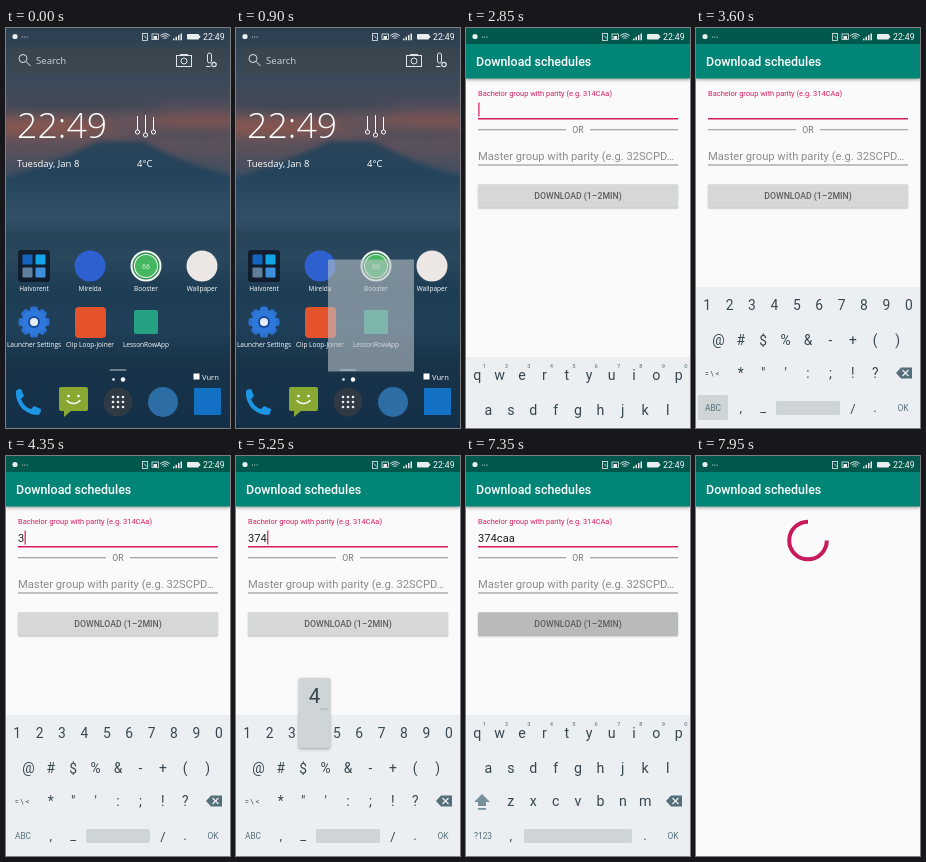
An HTML page with a canvas for the animation above (8000 ms loop, 224 px wide and 400 px high).

```html
<!DOCTYPE html>
<html lang="en">
<head>
<meta charset="utf-8">
<title>Schedule download</title>
<style>
html, body { margin: 0; width: 100%; height: 100%; overflow: hidden; background: #fafafa; }
canvas { display: block; width: 224px; height: 400px; }
</style>
</head>
<body>
<canvas id="stage"></canvas>
<script>
const W = 224, H = 400, LOOP = 8000, STEP = 150;
const canvas = document.getElementById('stage');
const ctx = canvas.getContext('2d');
const ratio = window.devicePixelRatio || 1;
canvas.width = W * ratio;
canvas.height = H * ratio;

const ROBOTO = 'Roboto, sans-serif';
const OPEN = '"Open Sans", sans-serif';
const PINK = '#d81b60', INK = '#37474f', TEAL = '#008577';

function text(s, x, y, size, color, align = 'left', weight = 400, family = ROBOTO) {
  ctx.font = `${weight} ${size}px ${family}`;
  ctx.textAlign = align;
  ctx.fillStyle = color;
  ctx.fillText(s, x, y);
}

function box(x, y, w, h, color, r = 0) {
  ctx.fillStyle = color;
  ctx.beginPath();
  ctx.roundRect(x, y, w, h, r);
  ctx.fill();
}

function disc(x, y, r, color) {
  ctx.fillStyle = color;
  ctx.beginPath();
  ctx.arc(x, y, r, 0, Math.PI * 2);
  ctx.fill();
}

function ring(x, y, r, color, width = 1, from = 0, to = Math.PI * 2) {
  ctx.strokeStyle = color;
  ctx.lineWidth = width;
  ctx.beginPath();
  ctx.arc(x, y, r, from, to);
  ctx.stroke();
}

function poly(points, color) {
  ctx.fillStyle = color;
  ctx.beginPath();
  points.forEach(([x, y]) => ctx.lineTo(x, y));
  ctx.fill();
}

function line(x1, y1, x2, y2, color, width = 1) {
  ctx.strokeStyle = color;
  ctx.lineWidth = width;
  ctx.beginPath();
  ctx.moveTo(x1, y1);
  ctx.lineTo(x2, y2);
  ctx.stroke();
}

function shade(y1, y2, colors) {
  const g = ctx.createLinearGradient(0, y1, 0, y2);
  colors.forEach(([at, c]) => g.addColorStop(at, c));
  return g;
}

function withShadow(draw, blur = 3, dy = 1, color = 'rgba(0,0,0,.35)') {
  ctx.save();
  ctx.shadowColor = color;
  ctx.shadowBlur = blur * ratio;
  ctx.shadowOffsetY = dy * ratio;
  draw();
  ctx.restore();
}

// ---- status bar ----
function statusBar() {
  const c = '#e8eeee';
  disc(9, 8.5, 2.6, c);
  for (let i = 0; i < 3; i++) disc(16.5 + i * 2.3, 9, 0.6, c);
  ctx.strokeStyle = c;
  ctx.lineWidth = 0.8;
  ctx.strokeRect(136.5, 5.5, 5, 7);
  line(138, 7.5, 140.5, 10.5, c, 0.8);
  ctx.strokeRect(146, 6, 6.5, 5.5);
  box(147.5, 8, 3.5, 3, c);
  for (let i = 1; i < 4; i++) ring(159, 12, i * 2.1, c, 1, -Math.PI * 0.78, -Math.PI * 0.22);
  for (let i = 0; i < 4; i++) box(167 + i * 2.5, 10.5 - i * 1.7, 1.5, 1.7 + i * 1.7, c);
  box(181, 6, 12, 5.5, c, 1);
  box(193, 7.5, 1.2, 2.5, c);
  text('22:49', 197, 12.2, 8.7, '#f4f7f7');
}

// ---- home screen ----
function cloud(x, y, rx, ry, color) {
  ctx.fillStyle = color;
  ctx.beginPath();
  ctx.ellipse(x, y, rx, ry, 0, 0, Math.PI * 2);
  ctx.fill();
}

function wallpaper() {
  box(0, 0, W, H, shade(0, H, [
    [0, '#2b3f50'], [0.1, '#35495a'], [0.17, '#434a59'], [0.23, '#64535b'],
    [0.28, '#62525a'], [0.34, '#4a4f5e'], [0.4, '#344e64'], [0.47, '#35526a'],
    [0.52, '#284459'], [0.57, '#29475d'], [0.66, '#1d3d54'], [0.75, '#20405a'],
    [0.84, '#183348'], [1, '#143049']]));
  ctx.save();
  ctx.filter = 'blur(4px)';
  cloud(30, 99, 75, 9, 'rgba(150,88,74,.65)');
  cloud(200, 92, 55, 7, 'rgba(140,84,76,.5)');
  cloud(70, 77, 90, 4, 'rgba(48,64,82,.6)');
  cloud(180, 108, 60, 4, 'rgba(66,76,94,.6)');
  ctx.filter = 'blur(2.5px)';
  ctx.fillStyle = shade(112, 200, [[0, '#2b4459'], [0.4, '#23445c'], [0.7, '#2d4c64'], [1, 'rgba(45,76,100,0)']]);
  ctx.beginPath();
  ctx.moveTo(-10, 152);
  ctx.bezierCurveTo(30, 142, 66, 126, 92, 113);
  ctx.lineTo(138, 113);
  ctx.bezierCurveTo(160, 126, 190, 140, 236, 150);
  ctx.lineTo(236, 205);
  ctx.lineTo(-10, 205);
  ctx.fill();
  ctx.restore();
}

function searchBar() {
  const c = '#dfe3e8';
  box(5, 19, 214, 27, 'rgba(62,70,76,.6)', 1);
  ring(17, 30.5, 4, c, 1);
  line(20, 33.5, 24.5, 38, c, 1);
  text('Search', 30, 36, 9.6, '#cfd4da', 'left', 400, OPEN);
  ctx.strokeStyle = c;
  ctx.lineWidth = 1;
  ctx.strokeRect(170.5, 27.5, 15, 11);
  box(174, 26, 8, 1.5, c);
  ring(178, 33, 3, c, 1);
  mic(203.5, 31, c);
}

function mic(x, y, c) {
  ctx.strokeStyle = c;
  ctx.lineWidth = 1;
  ctx.beginPath();
  ctx.roundRect(x - 2, y - 6, 4, 10, 2);
  ctx.stroke();
  line(x - 3.5, y + 7.5, x + 1, y + 7.5, c);
  ring(x + 4.5, y + 5.5, 2.2, c, 1.2);
}

function gear(x, y) {
  ctx.save();
  ctx.translate(x, y);
  for (let i = 0; i < 8; i++) {
    box(-4, -15.5, 8, 8, '#2b6fd0', 2);
    ctx.rotate(Math.PI / 4);
  }
  ctx.restore();
  disc(x, y, 12.5, '#2f78db');
  disc(x, y, 6, '#184a9c');
  disc(x, y, 4, '#e9eef5');
}

function label(s, x, y) {
  text(s, x, y, 6.5, '#fff', 'center', 500, OPEN);
}

function apps() {
  box(12, 222, 32, 32, 'rgba(14,24,36,.85)', 3);
  ['#1565c0', '#12a5e8', '#5f7f9c', '#3f8fdc'].forEach((c, i) =>
    box(16.5 + i % 2 * 13, 226.5 + (i >> 1) * 13, 10, 10, c, 1));
  disc(84, 238, 15.5, '#2f60cf');
  disc(140, 238, 15.5, '#f1f5f1');
  ring(140, 238, 12.8, '#2f8f4c', 1.4);
  disc(140, 238, 11, '#45b85f');
  text('66', 140, 240.5, 7, '#d9f5df', 'center');
  disc(196, 238, 15.5, '#ece6e4');
  ['Halvorent', 'Mirelda', 'Booster', 'Wallpaper'].forEach((s, i) => label(s, 28 + i * 56, 263));
  gear(28, 294);
  box(69, 279, 31, 31, '#e5532d', 4);
  box(128, 282, 24, 24, '#27a184', 2);
  ['Launcher Settings', 'Clip Loop-Joiner', 'LessonRowApp'].forEach((s, i) => label(s, 28 + i * 56, 319));
}

function dock() {
  box(103.5, 341, 17, 2, 'rgba(170,180,188,.6)', 1);
  disc(107.5, 351.5, 1.4, '#c8cdd4');
  disc(117, 351.5, 2.2, '#fff');
  box(187.5, 345.5, 6, 6, '#fff');
  text('Vurn', 196, 352, 7.6, '#fff', 'left', 400, OPEN);

  ctx.fillStyle = '#1e96e6';
  ctx.beginPath();
  ctx.moveTo(10, 363);
  ctx.quadraticCurveTo(11, 361, 15, 361);
  ctx.lineTo(18, 368);
  ctx.lineTo(15, 371);
  ctx.quadraticCurveTo(18, 379, 25, 381);
  ctx.lineTo(28, 378);
  ctx.lineTo(35, 381);
  ctx.quadraticCurveTo(35, 386, 32, 387);
  ctx.bezierCurveTo(19, 387, 9, 376, 10, 363);
  ctx.fill();

  box(53, 359, 29, 24, '#88a832', 2);
  poly([[58, 382], [58, 389], [66, 382]], '#88a832');
  disc(62.5, 368, 1.3, '#fff');
  disc(72.5, 368, 1.3, '#fff');
  ring(67.5, 366.5, 9, '#fff', 1.4, 0.7, Math.PI - 0.7);

  disc(112, 374, 14.5, '#303a44');
  for (let i = 0; i < 9; i++) disc(107 + i % 3 * 5, 369 + Math.floor(i / 3) * 5, 1.3, '#eceff2');
  disc(157, 374, 15, '#2c6da6');
  box(188, 360, 27, 27, '#1271c4', 1);
}

function home() {
  wallpaper();
  statusBar();
  searchBar();
  text('22:49', 11, 109.5, 35.8, '#fff', 'left', 300, OPEN);
  [[131.5, 88, 104], [139.5, 87, 107], [147.5, 89, 104]].forEach(([x, top, y]) => {
    line(x, top, x, y - 2, '#fff', 1);
    ring(x, y, 2.1, '#fff', 1);
  });
  text('Tuesday, Jan 8', 11, 139, 9.5, '#fff', 'left', 400, OPEN);
  text('4°C', 131, 139, 9.5, '#fff', 'left', 400, OPEN);
  apps();
  dock();
}

// ---- app screens ----
function appFrame(title) {
  box(0, 0, W, H, '#fafafa');
  withShadow(() => box(0, 16, W, 34.5, TEAL), 3, 1.2);
  box(0, 0, W, 16, '#00574b');
  statusBar();
  text(title, 10, 38.2, 12.44, '#fff', 'left', 500);
}

function button(s, x, y, w, h, pressed, color) {
  withShadow(() => box(x, y, w, h, pressed ? '#b9bbbb' : '#d6d7d7', 1.2), 1.5, 0.6, 'rgba(0,0,0,.28)');
  text(s, x + w / 2, y + h / 2 + 3.2, 8.71, color, 'center', 500);
}

function welcome(pressed) {
  appFrame('LessonRowApp');
  text('Welcome to a better understanding of the timetable !', 10, 69.5, 8.71, '#757575');
  button('START', 87, 213.5, 50, 23.3, pressed, '#212121');
}

function form(typed, cursor, pressed) {
  appFrame('Download schedules');
  text('Bachelor group with parity (e.g. 314CAa)', 12, 68, 7.47, PINK);
  text(typed, 12, 86, 11.2, '#212121');
  if (cursor) {
    const x = 12.3 + ctx.measureText(typed).width;
    box(x, 74.5, 1.2, 14, PINK);
  }
  box(12, 90, 200, 1.4, PINK);
  box(12, 101.2, 88, 1, '#8d8d8d');
  box(124, 101.2, 88, 1, '#8d8d8d');
  text('OR', 112, 105, 8.71, '#757575', 'center');
  text('Master group with parity (e.g. 32SCPD…', 12, 132, 11.2, '#8c8c8c');
  box(12, 136.6, 200, 0.8, '#8a8a8a');
  button('DOWNLOAD (1–2MIN)', 12, 156.3, 200, 23.5, pressed, '#5c5f5f');
}

function spinner(from, to) {
  appFrame('Download schedules');
  ring(112, 84.5, 18.8, '#c8195a', 4, from * Math.PI * 2, to * Math.PI * 2);
}

// ---- keyboard ----
const ROWS = [277, 312, 345, 380];
const PITCH = 22.4;
const LAYOUT = {
  letters: ['qwertyuiop', 'asdfghjkl', 'zxcvbnm'],
  symbols: ['1234567890', '@#$%&-+()', '*"\':;!?']
};
const ROW_START = [11.2, 22.4, 44.8];

function popup(ch, mode) {
  const row = LAYOUT[mode].findIndex(r => r.includes(ch));
  const x = ROW_START[row] + LAYOUT[mode][row].indexOf(ch) * PITCH;
  const y = ROWS[row];
  withShadow(() => box(x - 15.5, y - 55, 31, 70, '#cfd4d7', 1.5), 3, 1);
  text(ch, x, y - 30, 20.5, INK, 'center');
  for (let i = 0; i < 3; i++) disc(x + 7.5 + i * 2.5, y - 24, 0.6, '#607d8b');
}

function backspace() {
  poly([[200, 345], [205, 339.5], [216, 339.5], [216, 350.5], [205, 350.5]], '#546e7a');
  line(206.5, 342, 212.5, 348, '#eceff1', 1.3);
  line(212.5, 342, 206.5, 348, '#eceff1', 1.3);
}

function keyboard(mode, { key, switching, dy = 0 } = {}) {
  const letters = mode === 'letters';
  ctx.save();
  ctx.translate(0, dy);
  box(0, 259, W, 141, '#eceff1');
  if (switching) box(2, 367, 30, 25, '#cfd4d7', 1);
  LAYOUT[mode].forEach((row, r) => [...row].forEach((ch, i) => {
    const x = ROW_START[r] + i * PITCH;
    text(ch, x, ROWS[r] + 5, letters ? 14.2 : 13.8, INK, 'center');
    if (letters && r === 0) text((i + 1) % 10, x + 7, 270, 5.8, '#546e7a', 'center');
  }));
  if (letters) {
    poly([[16, 338], [24, 346], [20, 346], [20, 350], [12, 350], [12, 346], [8, 346]], '#78909c');
    box(12, 352, 8, 1.8, '#78909c');
  } else {
    text('= \\ <', 16, 348, 7.5, INK, 'center');
    text('_', 67.2, 384, 13, INK, 'center');
    text('/', 157, 385, 13, INK, 'center');
  }
  backspace();
  text(letters ? '?123' : 'ABC', 17, 383, 8.4, '#546e7a', 'center');
  text(',', 44.8, 384, 13, INK, 'center');
  if (letters) box(58, 373, 108, 14, '#cfd4d7', 2);
  else box(80, 373, 64, 14, '#cfd4d7', 2);
  text('.', 179, 384, 13, INK, 'center');
  text('OK', 207, 383, 8.4, '#546e7a', 'center');
  if (key) popup(key, mode);
  ctx.restore();
}

// ---- timeline ----
// [start, end, key, mode]
const PRESSES = [
  [4050, 4200, '3', 'symbols'], [4800, 4950, '7', 'symbols'], [5100, 5400, '4', 'symbols'],
  [5850, 6000, 'c', 'letters'], [6000, 6150, 'a', 'letters'], [6300, 6450, 'a', 'letters']
];
const within = (t, a, b) => t >= a && t < b;
const mix = (a, b, k) => a + (b - a) * k;

function opening(t) {
  home();
  if (t < 750) {
    disc(140, 294, 15, 'rgba(220,225,228,.12)');
    return;
  }
  const stages = [[118, 264, 44, 58, 0.35], [92, 231.5, 86, 112, 0.58], [42, 108, 152, 232, 0.86]];
  const [x, y, w, h, a] = stages[Math.min(2, Math.floor((t - 750) / STEP))];
  box(x, y, w, h, `rgba(${[176, 186, 194].map(v => Math.round(mix(v, 240, (a - 0.35) * 0.8)))},${a})`);
}

function entering(t) {
  welcome(true);
  if (t < 2550) return;
  ctx.save();
  ctx.globalAlpha = 0.7;
  ctx.translate(0, 14);
  form('', false, false);
  ctx.restore();
}

function editing(t) {
  const done = PRESSES.filter(p => t >= p[0]);
  const typed = done.map(p => p[2]).join('');
  const press = PRESSES.find(p => within(t, p[0], p[1]));
  const last = done.length ? done[done.length - 1][0] : 2700;
  const cursor = t < 7350 && Math.floor((t - last) / 500) % 2 === 0;
  form(typed, cursor, within(t, 7350, 7650));
  if (t < 2850) return;
  const mode = within(t, 3600, 5700) ? 'symbols' : 'letters';
  const dy = t < 3000 ? 70 : t >= 7500 ? 85 : 0;
  const switching = within(t, 3300, 3750) || within(t, 5550, 5850);
  keyboard(mode, { key: press && press[2], switching, dy });
}

function draw(t) {
  if (t < 600) home();
  else if (t < 1200) opening(t);
  else if (t < 2400) welcome(false);
  else if (t < 2700) entering(t);
  else if (t < 7650) editing(t);
  else if (t < 7800) spinner(-0.22, 0.12);
  else if (t < 7950) spinner(-0.12, 0.45);
  else spinner(0, 0.75);
}

function tick() {
  const t = Math.floor(performance.now() % LOOP / STEP) * STEP;
  ctx.setTransform(ratio, 0, 0, ratio, 0, 0);
  ctx.clearRect(0, 0, W, H);
  draw(t);
  requestAnimationFrame(tick);
}
tick();
</script>
</body>
</html>
```
